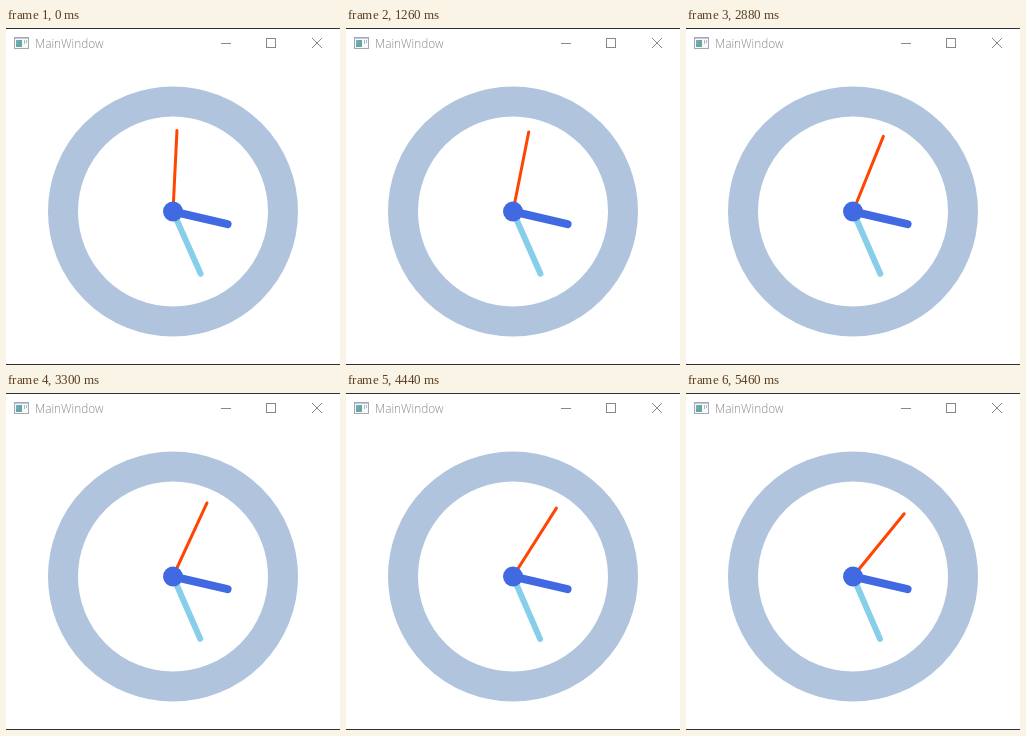
Animation, 334 px wide and 337 px high, one loop 5520 ms. Source, as an HTML page:

```html
<!DOCTYPE html>
<html lang="en">
<head>
<meta charset="utf-8">
<title>Clock</title>
<style>
  html, body { margin: 0; width: 100%; height: 100%; overflow: hidden; background: #fff; }
  svg { display: block; width: 334px; height: 337px; }
  .title { font: 300 11.8px "Open Sans", "Noto Sans", sans-serif; fill: #888; }
  .controls { fill: none; stroke: #888; }
  .hand { stroke-linecap: round; }
</style>
</head>
<body>
<svg viewBox="0 0 334 337">
  <rect width="334" height="337" fill="#fff"/>
  <path d="M0 .5H334M0 336.5H334" stroke="#303030"/>

  <g shape-rendering="crispEdges">
    <rect x="8.5" y="9.5" width="14" height="11" fill="#fafafa" stroke="#a4a8b2"/>
    <path d="M9 10.5H22" stroke="#c4c8d2"/>
    <rect x="10" y="12" width="6" height="7" fill="#62ab9c"/>
    <rect x="10" y="12" width="3" height="4" fill="#7aa4cc"/>
    <path d="M18 12V16M20.5 12V15" stroke="#a9b8d0"/>
  </g>
  <text class="title" x="29" y="19.5">MainWindow</text>

  <g class="controls">
    <path d="M215 15.5H225"/>
    <rect x="260.5" y="10.5" width="9" height="9"/>
    <path d="M306 10L316 20M316 10L306 20"/>
  </g>

  <circle cx="167" cy="183.5" r="110" fill="none" stroke="#b0c4de" stroke-width="30"/>
  <g transform="translate(167 183.5)">
    <path id="second" class="hand" d="M0 0V-81" stroke="#ff4500" stroke-width="3"/>
    <path id="minute" class="hand" d="M0 0V-68" stroke="#87ceeb" stroke-width="6"/>
    <path id="hour" class="hand" d="M0 0V-56" stroke="#4169e1" stroke-width="8"/>
    <circle r="10" fill="#4169e1"/>
  </g>
</svg>
<script>
  const LOOP = 5520, STEP = 60;
  // Start angle and degrees added per step for each hand.
  const hands = [
    ["second", 2.8, 0.4],
    ["minute", 156.05, 0.4 / 60],
    ["hour", 103, 0.4 / 720],
  ].map(([id, start, rate]) => ({ node: document.getElementById(id), start, rate }));

  const origin = performance.now();

  function draw(now) {
    const step = Math.floor(Math.max(0, now - origin) % LOOP / STEP);
    for (const { node, start, rate } of hands) {
      node.setAttribute("transform", `rotate(${start + rate * step})`);
    }
    requestAnimationFrame(draw);
  }
  draw(origin);
</script>
</body>
</html>
```
